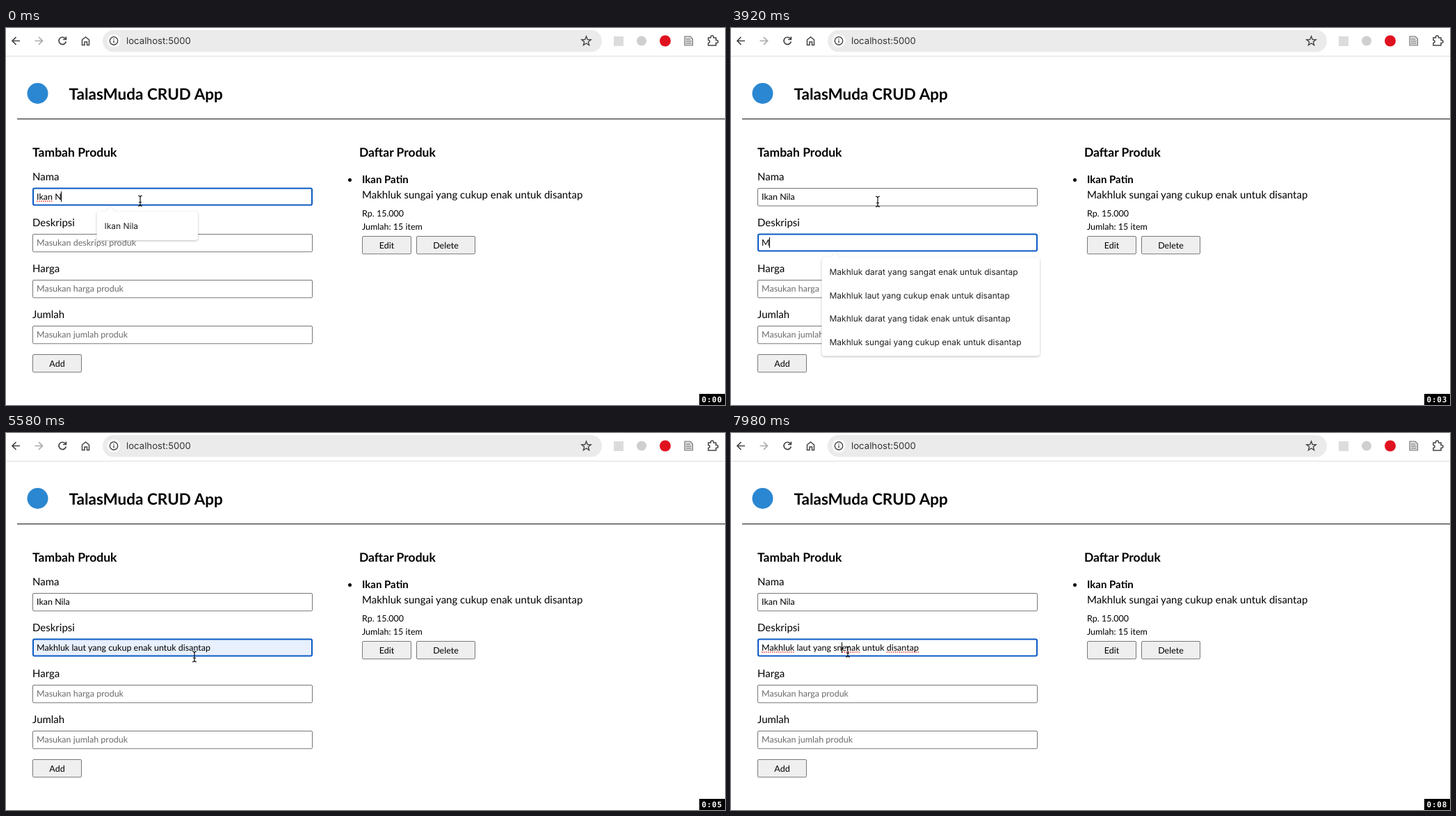
Write an HTML page that moves like this. It is 1034 px wide and 542 px high and loops after 8 s.

```html
<!DOCTYPE html>
<html lang="id">
<head>
<meta charset="utf-8">
<title>CRUD App</title>
<style>
html, body { margin: 0; width: 100%; height: 100%; overflow: hidden; background: #fff; }
svg { display: block; }
text { font: 15px Lato, sans-serif; white-space: pre; text-rendering: geometricPrecision; }
.h1 { font-size: 22.5px; font-weight: 700; }
.h2 { font-size: 17.55px; font-weight: 700; }
.b { font-weight: 700; }
.s { font-size: 12.5px; }
.mid { text-anchor: middle; }
.hint { fill: #6c6c6c; }
.url { font: 13.2px Inter, sans-serif; fill: #333; }
.opt { font: 12px Inter, sans-serif; fill: #222; }
.clock { font: bold 11px "DejaVu Sans Mono", monospace; letter-spacing: .8px; fill: #fff; }
.icon { fill: none; stroke: #444; stroke-width: 1.7; }
.pop { filter: drop-shadow(0 1px 1.5px #0004); }
</style>
</head>
<body>
<svg width="1034" height="542" viewBox="0 0 1034 542">
  <!-- browser bar -->
  <path d="M0 40.5H1034" stroke="#dedede"/>
  <rect x="139" y="3" width="718" height="31.5" rx="15.7" fill="#ebebeb"/>
  <g class="icon">
    <path d="M20 18.5H9.5M14.5 13L9 18.5L14.5 24"/>
    <path d="M41.5 18.5H52M47 13L52.5 18.5L47 24" stroke="#aaa"/>
    <path d="M85.5 15.5A5.2 5.2 0 1 0 86.3 19.5M86.4 12.5V16.5H82"/>
    <path d="M109.5 17V24.5H113V20H116.5V24.5H119.5V17L114.5 13Z" stroke-width="1.5"/>
    <circle cx="155" cy="18.5" r="9.5" fill="#fff" stroke="none"/>
    <circle cx="155" cy="18.5" r="5.7" stroke-width="1.4"/>
    <path d="M155 17.7V21.5M155 15.2V16.6" stroke-width="1.4"/>
    <path id="star" stroke-width="1.4"/>
    <path d="M976 12H984L987.5 15.5V25H976ZM978 16H984M978 19H985.5M978 22H985.5" fill="#ddd" stroke="#777" stroke-width="1.2"/>
    <path d="M1010 14H1013.5V13A2 2 0 0 1 1017.5 13V14H1021V17.5H1022A2 2 0 0 1 1022 21.5H1021V25H1010V21.5A2 2 0 0 0 1010 17.5Z" stroke-width="1.5"/>
  </g>
  <rect x="874" y="12" width="14" height="14" fill="#dcdcdc"/>
  <circle cx="914" cy="18.5" r="7" fill="#cfcfcf"/>
  <circle cx="948" cy="18.5" r="8" fill="#e0121f"/>
  <text class="url" x="173" y="23">localhost:5000</text>

  <!-- page -->
  <circle cx="45.5" cy="94" r="15" fill="#2b87d1"/>
  <text class="h1" x="90.5" y="102.5">TalasMuda CRUD App</text>
  <path d="M16 130.8H1034" stroke="#000"/>
  <text class="h2" x="38" y="185">Tambah Produk</text>
  <text class="h2" x="508" y="185">Daftar Produk</text>
  <circle cx="494.5" cy="218.5" r="2.5"/>
  <text class="b" x="512" y="222.5">Ikan Patin</text>
  <text x="512" y="244.5">Makhluk sungai yang cukup enak untuk disantap</text>
  <text class="s" x="512" y="270.5">Rp. 15.000</text>
  <text class="s" x="512" y="289.5">Jumlah: 15 item</text>
  <g id="live"></g>
  <rect x="997" y="526" width="37" height="16"/>
  <text id="clock" class="clock" x="1000.5" y="538"></text>
</svg>
<script>
const $ = id => document.getElementById(id);
const pen = document.createElement('canvas').getContext('2d');
pen.font = '12.5px Lato, sans-serif';
pen.textRendering = 'geometricPrecision';
const width = s => pen.measureText(s).width;

const animals = ['darat yang sangat', 'laut yang cukup', 'darat yang tidak', 'sungai yang cukup']
  .map(s => `Makhluk ${s} enak untuk disantap`);
const sea = animals[1], fish = ['Ikan Nila', 'Ikan Paus'];
const cut = 'Makhluk laut yang ', tail = 'enak untuk disantap';
const typos = ['Makhluk', 'enak', 'disantap'];

// Each step overrides part of the state: name, desc, focused field, caret on,
// caret index, suggestions, hovered suggestion, autofilled, typos, pointer
const steps = [
  [0, { name: 'Ikan N', desc: '', focus: 0, caret: 1, at: -1, pop: [fish[0]], hover: -1, fill: 0, bad: ['Ikan'], ptr: [193, 249] }],
  [300, { caret: 0 }],
  [740, { name: 'Ikan ', caret: 1 }],
  [890, { pop: fish }],
  [1360, { name: 'Ikan i' }],
  [1510, { pop: [] }],
  [1960, { name: 'Ikan ' }],
  [2090, { name: 'Ikan N', pop: [fish[0]] }],
  [2210, { name: 'Ikan Ni' }],
  [2330, { name: 'Ikan Nil' }],
  [2450, { name: 'Ikan Nila' }],
  [2570, { pop: [] }],
  [2870, { focus: 1, bad: [] }],
  [3320, { caret: 0, ptr: [211, 250] }],
  [3920, { desc: 'M', caret: 1, pop: animals }],
  [4240, { caret: 0 }],
  [4370, { ptr: [213, 268] }],
  [4500, { ptr: [222, 318] }],
  [4630, { ptr: [231, 352, 1], hover: 0, desc: animals[0], fill: 1 }],
  [4760, { ptr: [239, 388, 1], hover: 1, desc: sea }],
  [4970, { pop: [], hover: -1, caret: 1 }],
  [5140, { ptr: [242, 385, 1] }],
  [5290, { ptr: [252, 368], caret: 0 }],
  [5440, { ptr: [265, 342, 1] }],
  [5570, { ptr: [271, 322] }],
  [5700, { ptr: [272, 319] }],
  [5850, { caret: 1 }],
  [6020, { desc: sea.slice(0, -1), fill: 0, pop: [sea] }],
  [6170, { desc: sea }],
  [6330, { pop: [] }],
  [6480, { ptr: [243, 317] }],
  [6630, { ptr: [196, 315] }],
  [6780, { ptr: [183, 315], at: cut.length + 6 }],
  [7220, { caret: 0 }],
  [7370, { desc: cut + tail, at: cut.length, caret: 1, ptr: [168, 315] }],
  [7520, { bad: typos }],
  [7810, { desc: cut + 's' + tail, at: cut.length + 1 }],
  [7980, { desc: cut + 'sn' + tail, at: cut.length + 2 }]
];
const ticks = [910, 1960, 3020, 3940, 4990, 6040, 6920, 7960];

const text = (x, y, s, c = '') => `<text class="${c}" x="${x}" y="${y}">${s}</text>`;
const rect = (x, y, w, h, fill, stroke = 'none', line = 1, r = 1.5) =>
  `<rect x="${x}" y="${y}" width="${w}" height="${h}" rx="${r}" fill="${fill}" stroke="${stroke}" stroke-width="${line}"/>`;
const button = (x, y, w, s) =>
  rect(x + .5, y + .5, w, 25.3, '#efefef', '#777') + text(x + .5 + w / 2, y + 17.5, s, 's mid');

function field(i, label, value, s) {
  const y = 230 + Math.round(i * 66.1), on = s.focus === i;
  const bg = on && s.fill ? '#e8f0fe' : '#fff';
  let out = text(38, y - 11, label);
  out += on ? rect(39, y + .5, 401, 24, bg, '#0b5ac4', 2, 2)
            : rect(38.5, y + .5, 402, 25.3, bg, '#767676');
  out += value ? text(44, y + 17, value, 's')
               : text(44, y + 17, `Masukan ${label.toLowerCase()} produk`, 's hint');
  if (!on) return out;
  for (const word of s.bad) {
    const k = value.indexOf(word);
    if (k < 0) continue;
    const x = 44 + width(value.slice(0, k));
    out += `<path d="M${x} ${y + 19}h${width(word)}" stroke="#e53529" stroke-width="1.5" stroke-dasharray="1.5 1.5"/>`;
  }
  if (s.caret) {
    const x = Math.floor(44 + width(s.at < 0 ? value : value.slice(0, s.at)));
    out += `<path d="M${x + .5} ${y + 5}v15" stroke="#000"/>`;
  }
  return out;
}

function popup(s) {
  const n = s.pop.length;
  if (!n) return '';
  const y = 264 + s.focus * 66, h = 7.5 + 33.5 * n;
  const w = n > 2 ? 313.5 : s.focus ? 291.5 : 145.5;
  return `<g class="pop">${rect(130.5, y, w, h, '#fff', 'none', 1, 4)}` +
    `<path d="M142 ${y + 1}l8 -8l8 8z" fill="#fff"/></g>` +
    s.pop.map((p, i) => {
      const row = y + 4 + i * 33.5;
      return (i === s.hover ? rect(130.5, row, w, 33.5, '#ececec', 'none', 1, 0) : '') +
        text(141.5, row + 21.3, p, 'opt');
    }).join('');
}

function pointer([x, y, arrow]) {
  return arrow
    ? `<path d="M${x} ${y - 1}v14l3.3 -3l2.5 5.5l2.3 -1l-2.4 -5.3h4.5z" stroke="#fff"/>`
    : `<path d="M${x - 3} ${y - 8}q3 0 3 2.5q0 -2.5 3 -2.5m-3 2.5v10m-3 2.5q3 0 3 -2.5q0 2.5 3 2.5m-5 -5.5h4" fill="none" stroke="#111" stroke-width="1.2"/>`;
}

function draw(t) {
  const s = Object.assign({}, ...steps.filter(k => k[0] <= t).map(k => k[1]));
  $('live').innerHTML =
    button(512, 299, 70, 'Edit') + button(590, 299, 84, 'Delete') + button(38, 469, 70, 'Add') +
    field(0, 'Nama', s.name, s) + field(1, 'Deskripsi', s.desc, s) +
    field(2, 'Harga', '', s) + field(3, 'Jumlah', '', s) +
    popup(s) + pointer(s.ptr);
  $('clock').textContent = '0:0' + ticks.filter(k => k <= t).length;
}

$('star').setAttribute('d', 'M' + Array.from({ length: 10 }, (_, i) => {
  const a = i * Math.PI / 5, r = i % 2 ? 3 : 7;
  return `${834.5 + r * Math.sin(a)} ${19 - r * Math.cos(a)}`;
}).join('L') + 'Z');

(function loop() {
  draw(performance.now() % 8000);
  requestAnimationFrame(loop);
})();
</script>
</body>
</html>
```
